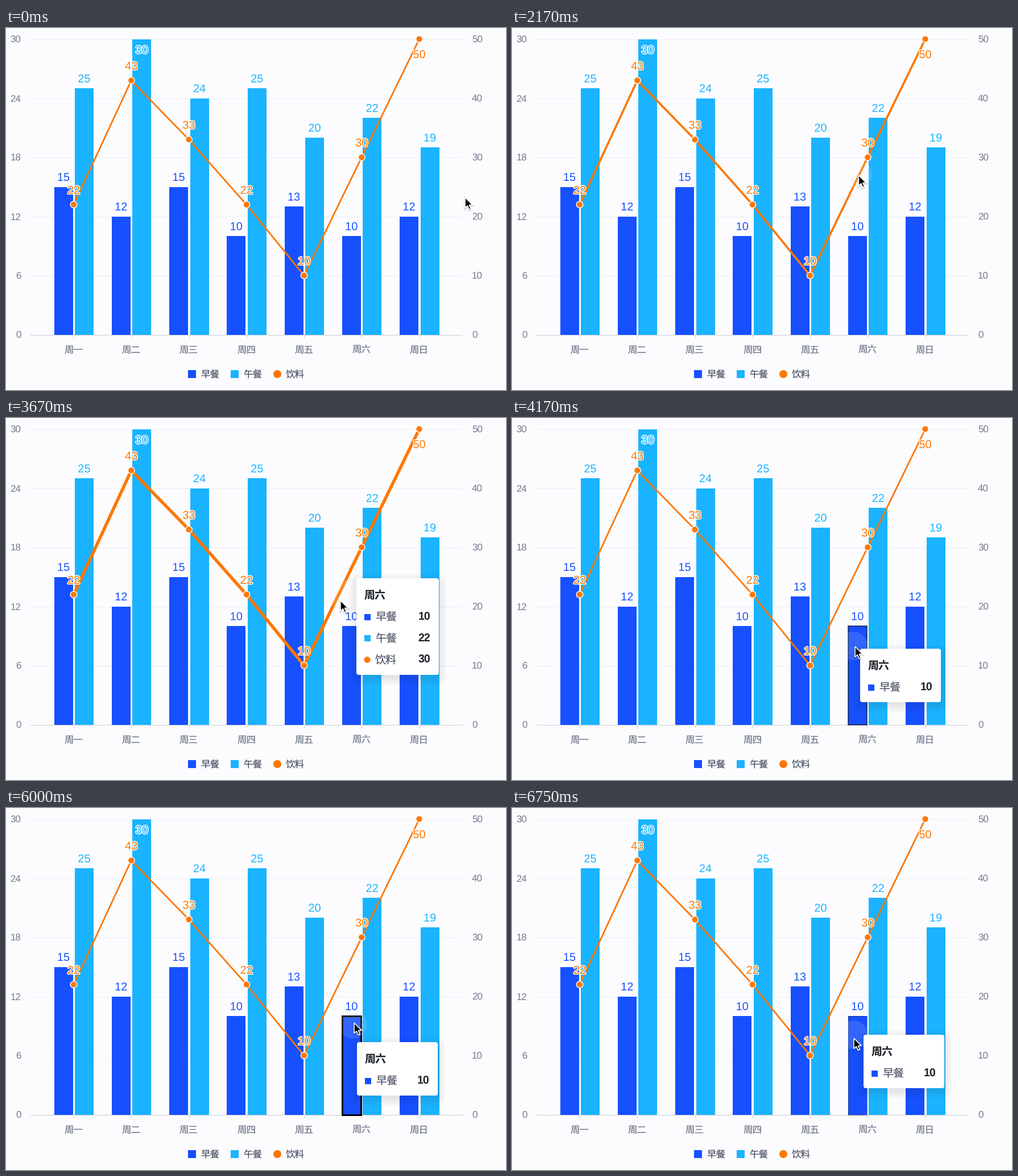
Write a matplotlib script that moves like this. It is 879x637 px and loops after 6.91 s.

```python
import numpy as np
import matplotlib.pyplot as plt
from matplotlib.animation import FuncAnimation
from matplotlib.patches import Circle, FancyBboxPatch, Polygon, Rectangle
from matplotlib.patheffects import withStroke

W, H, DPI = 879, 637, 64
PT = 72 / DPI  # points per pixel
LOOP_MS, STEPS = 6910, 83
NAVY, SKY, ORANGE = "#1650ff", "#1ab3ff", "#fe7700"
LATIN, CJK = "Liberation Sans", "Noto Sans CJK JP"
DAYS = ["周" + c for c in "一二三四五六日"]
BREAKFAST = [15, 12, 15, 10, 13, 10, 12]
LUNCH = [25, 30, 24, 25, 20, 22, 19]
DRINKS = [22, 43, 33, 22, 10, 30, 50]
SERIES = [("早餐", NAVY, BREAKFAST), ("午餐", SKY, LUNCH), ("饮料", ORANGE, DRINKS)]
BASE, TOP = 539.5, 19.5
FOCUS = 5

plt.rcParams["text.hinting"] = "none"
fig = plt.figure(figsize=(W / DPI, H / DPI), dpi=DPI, facecolor="#fcfcff")
ax = fig.add_axes([0, 0, 1, 1])
ax.set(xlim=(0, W), ylim=(H, 0))
ax.axis("off")


def center(i):
    return 119 + 101.25 * i


def height(value, full):
    return BASE - (BASE - TOP) * value / full


def text(x, cy, s, size, color, ha="center", z=6, weight="normal", halo=False):
    """Text whose glyphs are vertically centred on cy."""
    digits = s.isdigit()
    label = ax.text(x, cy + size * (0.35 if digits else 0.37), s,
                    fontsize=size * PT, color=color, ha=ha, va="baseline",
                    family=LATIN if digits else CJK, weight=weight, zorder=z)
    if halo:
        label.set_path_effects([withStroke(linewidth=3 * PT, foreground="white")])
    return label


def add(patch):
    return ax.add_patch(patch)


def box(x, y, w, h, color, z=2):
    return add(Rectangle((x, y), w, h, fc=color, lw=0, zorder=z))


def rounded(x, y, w, h, r, color, z, alpha=1):
    return add(FancyBboxPatch((x, y), w, h, boxstyle=f"round,pad=0,rounding_size={r}",
                              fc=color, lw=0, alpha=alpha, zorder=z))


def marker(x, cy, side, color, z):
    if color == ORANGE:
        return add(Circle((x + side / 2, cy), side / 2, fc=color, lw=0, zorder=z))
    return box(x, cy - side / 2, side, side, color, z)


def draw_chart():
    for k in range(6):
        y = BASE - 104 * k
        if k:
            ax.plot([43, 802], [y, y], color="#eceef5", lw=PT, zorder=1)
        text(26.5, y + 0.5, str(6 * k), 17, "#737b8c", "right")
        text(819, y + 0.5, str(10 * k), 17, "#737b8c", "left")
    for i, day in enumerate(DAYS):
        x = center(i)
        for left, color, value in ((x - 34.5, NAVY, BREAKFAST[i]), (x + 2, SKY, LUNCH[i])):
            y = height(value, 30)
            box(left, y, 33, BASE - y, color)
            text(left + 16.5, y + (18.5 if value == 30 else -17.5), str(value), 20,
                 color, halo=True)
        y = height(DRINKS[i], 50)
        add(Circle((x, y), 5.8, fc=ORANGE, ec="white", lw=1.4 * PT, zorder=5))
        text(x, y + (26.5 if DRINKS[i] == 50 else -26), str(DRINKS[i]), 20, ORANGE,
             z=7, halo=True)
        ax.plot([x, x], [540, 545], color="#c9cdd6", lw=PT, zorder=1)
        text(x, 565, day, 16.5, "#6f7788")
    ax.plot([43, 802], [BASE + 0.5] * 2, color="#c9cdd6", lw=PT, zorder=3)
    for k, (name, color, _) in enumerate(SERIES):
        marker(320 + 75 * k, 609, 14, color, 2)
        text(342 + 75 * k, 608.5, name, 16.5, "#4e5566", "left")


draw_chart()
line, = ax.plot([center(i) for i in range(7)], [height(v, 50) for v in DRINKS],
                color=ORANGE, zorder=4, solid_joinstyle="round")
bar_top = height(BREAKFAST[FOCUS], 30)
border = add(Rectangle((center(FOCUS) - 34.5, bar_top), 33, BASE - bar_top,
                       fill=False, ec="black", zorder=3.5))
ripple = add(Circle((0, 0), 25, fc="white", lw=0, alpha=0.13, zorder=8))

ARROW = np.array([(0, 0), (0, 18.5), (4.3, 14.6), (7.2, 21.4), (10.3, 20.1),
                  (7.4, 13.4), (13.2, 13.4)])
arrow_shade = add(Polygon(ARROW, fc="black", ec="black", lw=3.5 * PT, alpha=0.13, zorder=20))
arrow = add(Polygon(ARROW, fc="black", ec="white", lw=1.6 * PT, zorder=21))


def draw_tooltip(x, y, rows):
    w, h = (145, 170) if rows == 3 else (142, 94)
    parts = [rounded(x - s, y + 5 - s, w + 2 * s, h + 2 * s, 4 + s, "#1a2440", 9, 0.011)
             for s in range(0, 15, 2)]
    parts.append(rounded(x, y, w, h, 4, "white", 10))
    parts.append(text(x + 14, y + 29, DAYS[FOCUS], 19, "#1d2129", "left", 11, "bold"))
    for k, (name, color, values) in enumerate(SERIES[:rows]):
        cy = y + 66.5 + 37.7 * k
        parts += [marker(x + 13.5, cy + 1.5, 11, color, 11),
                  text(x + 33, cy, name, 19, "#4e5566", "left", 11),
                  text(x + w - 14.5, cy, str(values[FOCUS]), 19.5, "#1d2129", "right", 11, "bold")]
    return parts


# Paths as (step, x, y), linear in between
POINTER = [(3, 807, 298), (5, 690, 238), (6, 664, 227), (9, 633, 234), (12, 617, 250),
           (14, 617, 250), (17, 612, 255), (24, 612, 255), (27, 608, 261), (42, 608, 261),
           (44, 588, 321), (45, 590, 350), (48, 600, 398), (50, 603, 402), (66, 603, 402),
           (69, 607, 398), (72, 612, 378), (75, 610, 332), (78, 614, 327), (80, 604, 390),
           (81, 601, 405)]
TOOLTIP = [(27, 620, 273), (29, 622, 275), (42, 622, 275), (44, 616, 282), (45, 606, 307),
           (47, 606, 372), (50, 612, 406), (53, 617, 416), (66, 617, 416), (69, 619, 414),
           (72, 617, 412), (75, 623, 383), (78, 628, 353), (80, 622, 385), (81, 618, 399)]
tooltip_parts = []


def along(path, step):
    steps, xs, ys = zip(*path)
    return np.array([np.interp(step, steps, xs), np.interp(step, steps, ys)])


def update(frame):
    step = frame - (frame % 3 == 1)  # every third step repeats the one before
    tip = along(POINTER, step)
    arrow.set_xy(ARROW + tip)
    arrow_shade.set_xy(ARROW + tip + (0, 1.5))
    ripple.center = 0.6 * tip + 0.4 * along(POINTER, step - 1) - (2, 0)
    line.set_linewidth(PT * np.interp(step, [24, 30, 44, 50], [2.8, 5.5, 5.5, 2.8]))
    edge = np.interp(step, [45, 50, 51, 72, 78, 81], [0, 1.5, 3, 3, 0, 0.9])
    border.set_linewidth(edge * PT)
    border.set_alpha(min(1, edge / 2))
    while tooltip_parts:
        tooltip_parts.pop().remove()
    if step >= 27:
        on_bar = 47 <= step < 74 or step >= 80
        tooltip_parts.extend(draw_tooltip(*along(TOOLTIP, step), 1 if on_bar else 3))
    return []


anim = FuncAnimation(fig, update, frames=STEPS, interval=LOOP_MS / STEPS,
                     init_func=lambda: update(0), repeat=True, repeat_delay=0)
plt.show()
```
